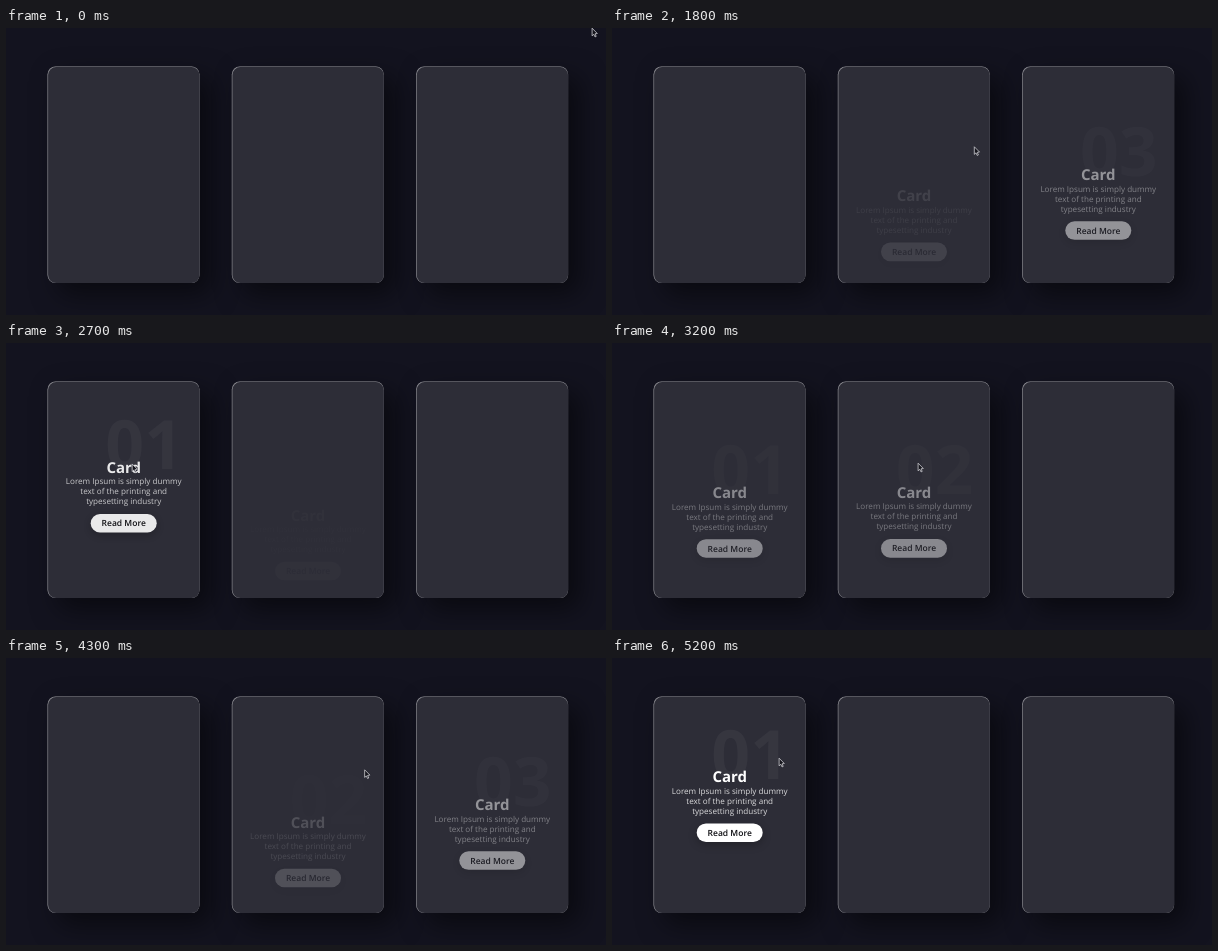
An HTML page with a canvas for the animation above (6600 ms loop, 600x287 px).

```html
<!DOCTYPE html>
<html lang="en">
<head>
<meta charset="utf-8">
<title>Hover cards</title>
<style>
  html, body { margin: 0; width: 100%; height: 100%; overflow: hidden; background: #13131f; }
  canvas { display: block; width: 100vw; height: 100vh; }
</style>
</head>
<body>
<canvas id="stage"></canvas>
<script>
const W = 600, H = 287, LOOP = 6600, TICK = 100;
const FADE = 500, RISE = 54.3;
const FONT = '"Open Sans", "Noto Sans", sans-serif';
const CARD = { x: 41.5, y: 38.5, w: 152, h: 216.5, r: 8, pitch: 184.3, edge: 0.6 };
const LINES = ['Lorem Ipsum is simply dummy', 'text of the printing and', 'typesetting industry'];

// Times at which the pointer enters and leaves each card, in turn
const hovers = [
  [2390, 3036, 4670],
  [1750, 2285, 3069, 3420, 4230, 4597],
  [1035, 1650, 3505, 4150]
];

// Key points of the pointer's path: time, x, y
const path = [
  [850, 586, 0], [1300, 536, 105], [1700, 394, 119], [2300, 219, 113], [2750, 124, 121],
  [3200, 306, 120], [3700, 469, 126], [3900, 487, 124], [4700, 198, 101], [5000, 167, 100]
];

const stage = document.getElementById('stage');
const layer = document.createElement('canvas');
const scale = window.devicePixelRatio || 1;
const [ctx, ink] = [stage, layer].map(canvas => {
  canvas.width = Math.round(W * scale);
  canvas.height = Math.round(H * scale);
  const c = canvas.getContext('2d');
  c.scale(scale, scale);
  c.textRendering = 'geometricPrecision';
  return c;
});

const bezier = (a, b, u) => 3 * a * u * (1 - u) ** 2 + 3 * b * u * u * (1 - u) + u ** 3;

// CSS "ease" curve
function ease(x) {
  if (x <= 0) return 0;
  if (x >= 1) return 1;
  let lo = 0, hi = 1;
  for (let i = 0; i < 24; i++) {
    const mid = (lo + hi) / 2;
    if (bezier(0.25, 0.25, mid) < x) lo = mid; else hi = mid;
  }
  return bezier(0.1, 1, lo);
}

// A reversed transition starts from its current value and is shortened to match.
function visibility(toggles, t) {
  let from = 0, to = 0, start = 0;
  const value = time => {
    const span = FADE * Math.abs(to - from);
    return span ? from + (to - from) * ease((time - start) / span) : to;
  };
  for (const time of toggles) {
    if (time > t) break;
    from = value(time);
    to = 1 - to;
    start = time;
  }
  return value(t);
}

// Monotone cubic through the key points; axis 1 is x, axis 2 is y
function pointerAt(t, axis) {
  const last = path.length - 1;
  if (t <= path[0][0]) return path[0][axis];
  if (t >= path[last][0]) return path[last][axis];
  const secant = i => {
    const a = path[Math.max(0, Math.min(last - 1, i))];
    const b = path[Math.max(1, Math.min(last, i + 1))];
    return (b[axis] - a[axis]) / (b[0] - a[0]);
  };
  const slope = i => {
    const before = secant(i - 1), after = secant(i);
    return before * after <= 0 ? 0 : 2 * before * after / (before + after);
  };
  const i = path.findIndex(p => p[0] > t) - 1;
  const [a, b] = [path[i], path[i + 1]];
  const span = b[0] - a[0], s = (t - a[0]) / span;
  return a[axis] + (b[axis] - a[axis]) * s * s * (3 - 2 * s)
    + span * s * (1 - s) * (slope(i) * (1 - s) - slope(i + 1) * s);
}

function setShadow(c, color, blur, dx, dy) {
  c.shadowColor = color;
  c.shadowBlur = blur * scale;
  c.shadowOffsetX = dx * scale;
  c.shadowOffsetY = dy * scale;
}

function roundBox(c, x, y, w, h, r, fill) {
  c.fillStyle = fill;
  c.beginPath();
  c.roundRect(x, y, w, h, r);
  c.fill();
}

function write(c, text, x, y, weight, size, color, align = 'center') {
  c.font = `${weight} ${size}px ${FONT}`;
  c.textAlign = align;
  c.fillStyle = color;
  c.fillText(text, x, y);
}

function drawCard(x) {
  const { y, w, h, r, edge } = CARD;
  ctx.save();
  setShadow(ctx, 'rgba(0,0,0,0.5)', 27, 11, 11);
  roundBox(ctx, x, y, w, h, r, '#2d2d37');
  ctx.restore();
  // The light edge tapers off around the corners.
  roundBox(ctx, x, y, w, h, r, '#8e8e94');
  roundBox(ctx, x + edge, y + edge, w - edge, h - edge, r, '#2d2d37');
}

function drawContent(x, label, shown) {
  const mid = x + CARD.w / 2 + 0.2;
  ink.clearRect(0, 0, W, H);
  ink.save();
  ink.translate(0, RISE * (1 - shown));
  write(ink, label, x + CARD.w - 16.5, 120.5, 700, 68, 'rgba(255,255,255,0.045)', 'right');
  write(ink, 'Card', mid, 124.2, 700, 15, '#fff');
  LINES.forEach((line, i) =>
    write(ink, line, mid, 135.8 + i * 10, 400, 8.1, 'rgba(255,255,255,0.82)'));
  ink.save();
  setShadow(ink, 'rgba(0,0,0,0.25)', 8, 0, 2.7);
  roundBox(ink, mid - 33, 165.4, 66, 18.6, 9.3, '#fff');
  ink.restore();
  write(ink, 'Read More', mid, 177.8, 600, 8.5, '#0c0c10');
  ink.restore();

  ctx.globalAlpha = shown;
  ctx.drawImage(layer, 0, 0, W, H);
  ctx.globalAlpha = 1;
}

function drawPointer(t) {
  ctx.save();
  ctx.translate(pointerAt(t, 1) + 0.1, pointerAt(t, 2) + 0.2);
  ctx.beginPath();
  [[0, 0], [0, 7.6], [1.7, 6.1], [2.9, 8.7], [4.1, 8.2], [2.9, 5.6], [5.2, 5.3]]
    .forEach(([x, y]) => ctx.lineTo(x, y));
  ctx.closePath();
  ctx.fillStyle = '#15151c';
  ctx.fill();
  ctx.strokeStyle = '#d0d0d5';
  ctx.lineWidth = 0.8;
  ctx.stroke();
  ctx.restore();
}

function draw(t) {
  ctx.fillStyle = '#13131f';
  ctx.fillRect(0, 0, W, H);
  hovers.forEach((toggles, i) => {
    const x = CARD.x + i * CARD.pitch;
    drawCard(x);
    drawContent(x, `0${i + 1}`, visibility(toggles, t));
  });
  drawPointer(t);
}

const begin = performance.now();
function frame() {
  const t = (performance.now() - begin) % LOOP;
  draw(Math.floor(t / TICK) * TICK);
  requestAnimationFrame(frame);
}
frame();
</script>
</body>
</html>
```
